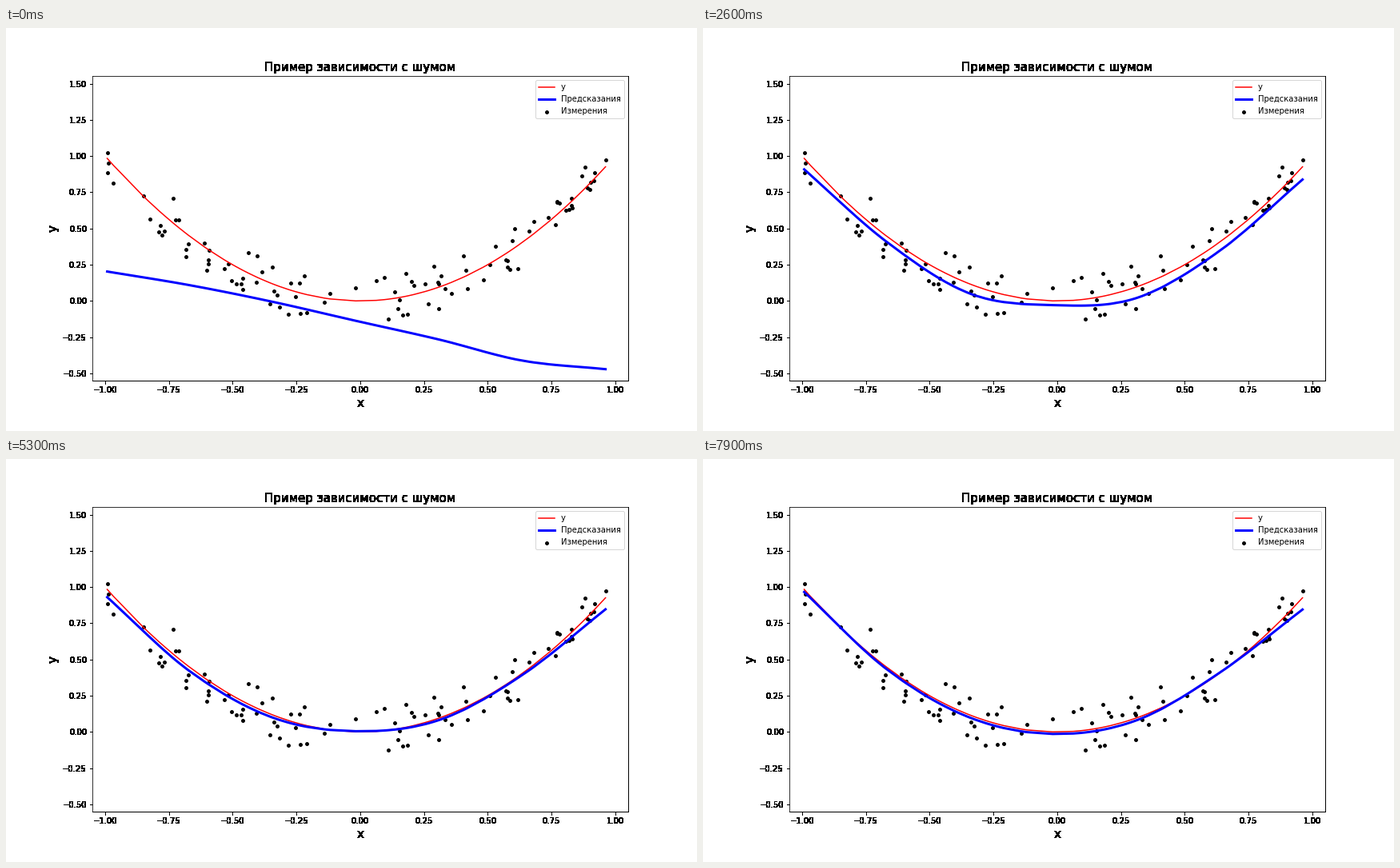
Write a matplotlib script that moves like this. It is 864 by 504 pixels and loops after 9000 ms.

```python
import numpy as np
import matplotlib.pyplot as plt
from matplotlib.animation import FuncAnimation

plt.rcParams["font.family"] = "DejaVu Sans"

FRAMES, INTERVAL = 90, 100
POINTS, NOISE = 100, .17

# Noisy measurements of y = x^2 from 24-bit seeded uniform numbers.
bits = np.random.RandomState(42).randint(0, 2 ** 32, 2 * POINTS, dtype=np.uint32)
signed = 2 * (bits & 0xFFFFFF) / 2 ** 24 - 1
xs, noise = np.sort(signed[:POINTS]), NOISE * signed[POINTS:]
ys = xs ** 2 + noise

# Height of the fitted curve at evenly spaced x, after some training steps.
FITS = {
    0: [.203, .108, -.007, -.138, -.267, -.412, -.471],
    10: [.116, -.003, .01, .1, .245, .443, .803],
    26: [.908, .405, .05, -.029, .02, .345, .838],
    38: [1.02, .435, .06, -.05, -.003, .325, .806],
    46: [.93, .415, .095, .007, .086, .415, .887],
    60: [.93, .418, .1, .003, .08, .373, .806],
    79: [.966, .43, .098, -.014, .08, .408, .845],
}
STEPS = list(FITS)


def heights_at(step):
    """Curve heights after a training step; the main descent slows down."""
    step = min(step, STEPS[-1])
    i = min(np.searchsorted(STEPS, step, side="right"), len(STEPS) - 1)
    a, b = STEPS[i - 1], STEPS[i]
    t = (step - a) / (b - a)
    if a == 10:
        t = 1 - (1 - t) ** 1.6
    return (1 - t) * np.array(FITS[a]) + t * np.array(FITS[b])


def smooth(heights):
    """Cubic Hermite curve through evenly spaced heights, sampled at xs."""
    slopes = np.gradient(heights)
    pos = (xs - xs[0]) / (xs[-1] - xs[0]) * (len(heights) - 1)
    i = np.minimum(pos.astype(int), len(heights) - 2)
    t = pos - i
    ease = t * t * (3 - 2 * t)
    return ((1 - ease) * heights[i] + ease * heights[i + 1]
            + t * (1 - t) ** 2 * slopes[i] - t * t * (1 - t) * slopes[i + 1])


def harden(image, dpi):
    """Turn every touched pixel fully opaque, so that no edge is soft."""
    image = image.copy()
    image[..., 3] = image[..., 3] > 0
    return image, 0, 0


fig, ax = plt.subplots(figsize=(12, 7), dpi=72)
fig.subplots_adjust(left=.125, right=.9, bottom=.125, top=.88)
fig.set_facecolor("white")

truth, = ax.plot(xs, xs ** 2, color="red", lw=1.5)
fit, = ax.plot(xs, smooth(heights_at(0)), color="blue", lw=3)
dots = ax.scatter(xs, ys, s=15, color="black")

ax.set(xlim=(-1.05, 1.05), ylim=(-.55, 1.55),
       xticks=np.arange(-1, 1.1, .25), yticks=np.arange(-.5, 1.6, .25))
title = ax.set_title("Пример зависимости с шумом", fontsize=15)
ax.set_xlabel("x", fontsize=15)
ax.set_ylabel("y", fontsize=15)
ax.legend([truth, fit, dots], ["y", "Предсказания", "Измерения"],
          loc="upper right", fontsize=10)
for artist in (title, ax.xaxis, ax.yaxis, ax.spines.right, ax.spines.bottom):
    artist.set_agg_filter(harden)


def update(frame):
    fit.set_ydata(smooth(heights_at(frame)))
    return fit,


anim = FuncAnimation(fig, update, frames=FRAMES, interval=INTERVAL,
                     repeat=True, repeat_delay=0)
plt.show()
```
